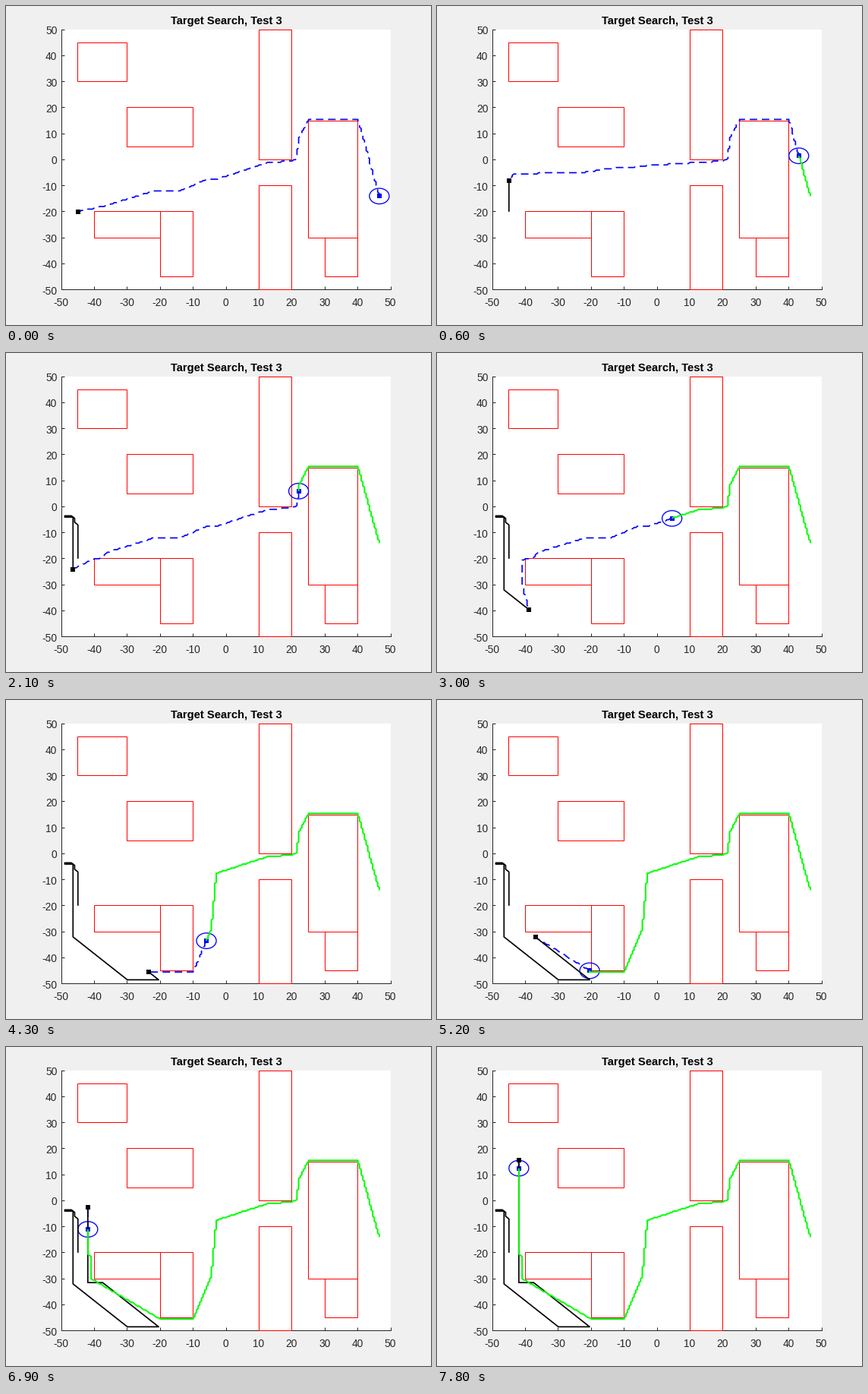
A matplotlib script that plays this animation: 560x420 px, repeating every 8800 ms.

```python
import numpy as np
import matplotlib.pyplot as plt
from matplotlib.animation import FuncAnimation
from matplotlib.patches import Ellipse, Rectangle
from matplotlib.transforms import Affine2D

W, H, DPI = 560, 420, 100
FRAMES, LAST, STEP_MS = 88, 78, 100
GRID = 0.5
PX = 72 / DPI  # points per pixel

plt.rcParams.update({
    "font.family": "Liberation Sans",
    "axes.unicode_minus": False,
})

# x, y, width, height
WALLS = [(-45, 30, 15, 15), (-30, 5, 20, 15), (10, 0, 10, 50),
         (10, -50, 10, 40), (25, -30, 15, 45), (30, -45, 10, 15),
         (-40, -30, 20, 10), (-20, -45, 10, 25)]

# corners of the two walks
RUN = np.array([(-45, -20), (-45, -7), (-46, -6), (-46, -4.5), (-47, -3.5),
                (-49, -3.5), (-49, -4), (-46.5, -4), (-46.5, -32),
                (-30, -48.5), (-20.5, -48.5), (-37.5, -31.5),
                (-42, -31.5), (-42, 15.5)])
CHASE = np.array([(46.5, -14), (40, 15.5), (25, 15.5), (22, 8), (21.5, 0.5),
                  (20, -0.5), (13, -1), (-3, -7.5), (-4.5, -29),
                  (-10, -45.5), (-20, -45.5), (-41, -30), (-41, -21.5),
                  (-42, -20.5), (-42, 12.5)])
FORK, DROP, BOTTOM = 6, 7, 10  # corner numbers in CHASE

# planned crossings of the open middle, for a low and a high goal
LOW = np.array([(-3, -7.5), (-6, -7.5), (-14, -12), (-22, -12), (-36, -17.5)])
HIGH = np.array([(-3, -2), (-6, -2.5), (-14, -3), (-22, -4.5), (-44, -5)])


def snap(points):
    """Walk a polyline on the planning grid."""
    pts = np.asarray(points, float)
    out = [pts[:1]]
    for a, b in zip(pts, pts[1:]):
        n = max(1, int(np.ceil(np.abs(b - a).max() / GRID)))
        out.append(a + (b - a) * np.arange(1, n + 1)[:, None] / n)
    return np.round(np.vstack(out) / GRID) * GRID


def grid_cost(d):
    """Three diagonal cells take as long as four straight ones."""
    return d.max(axis=1) + d.min(axis=1) / 3


def euclid(d):
    return np.hypot(*d.T)


def schedule(path, cost):
    """Time at which each corner is reached, at constant pace."""
    total = np.append(0, np.cumsum(cost(np.abs(np.diff(path, axis=0)))))
    return total / total[-1] * LAST


RUN_T = schedule(RUN, grid_cost)
CHASE_T = schedule(CHASE, euclid)


def walked(path, times, n):
    """Corners passed by time n, then the present position."""
    here = [np.interp(n, times, path[:, i]) for i in (0, 1)]
    return np.vstack([path[times < n], here])


def plan(n, here, goal):
    """Route from the seeker to the runner."""
    gx, gy = goal
    leg = np.searchsorted(CHASE_T, n, side="right")
    if leg <= DROP:
        w = np.clip((gy + 20) / 12.5, 0, 1)
        cross = (1 - w) * LOW + w * HIGH
        via = [*CHASE[leg:FORK + 1], *cross[cross[:, 0] < here[0]]]
        if gy < -20:
            via += [(-37.5, -19.5), (-41, -20.5)]
            if gx > -43.5:
                via.append((-41, -30))
    elif leg <= BOTTOM:
        via = [*CHASE[leg:BOTTOM + 1]]
    else:
        ahead = CHASE[leg:]
        via = [*ahead[ahead[:, 1] < gy - 2]]
    return snap([here, *via, goal])


fig = plt.figure(figsize=(W / DPI, H / DPI), dpi=DPI, facecolor="#f0f0f0")
ax = fig.add_axes([72.6 / W, 46.97 / H, 434 / W, 342.3 / H])
ax.set(xlim=(-50, 50), ylim=(-50, 50),
       xticks=range(-50, 51, 10), yticks=range(-50, 51, 10))
ink = "#262626"
ax.tick_params(direction="in", length=4.3 * PX, width=PX, color=ink,
               labelcolor=ink, labelsize=13.8 * PX)
ax.tick_params(axis="x", pad=10.7 * PX)
ax.tick_params(axis="y", pad=5.3 * PX)
for label in ax.get_yticklabels():
    label.set_transform(label.get_transform() + Affine2D().translate(0, -1))
for side in ("top", "right"):
    ax.spines[side].set_visible(False)
for side in ("left", "bottom"):
    ax.spines[side].set(color=ink, linewidth=PX)
fig.text(290 / W, 1 - 24 / H, "Target Search, Test 3", weight="bold",
         size=14.8 * PX, ha="center", va="baseline", color="black")

for x, y, w, h in WALLS:
    ax.add_patch(Rectangle((x, y), w, h, fill=False, ec="red", lw=PX,
                           snap=True, clip_on=False, zorder=3))

# smooth lines run through pixel centres
centred = ax.transData + Affine2D().translate(0.5, -0.5)


def line(color, width, z, **kw):
    return ax.plot([], [], color=color, lw=width * PX, zorder=z, snap=False,
                   solid_capstyle="butt", transform=centred, **kw)[0]


def dot(color, z):
    return ax.plot([], [], "s", color=color, ms=6 * PX, mew=0, zorder=z,
                   transform=centred)[0]


route = line("blue", 1.7, 4, dashes=(10 / 1.7, 6 / 1.7),
             dash_capstyle="butt")
ring = ax.add_patch(Ellipse((0, 0), 6, 6, fill=False, ec="blue",
                            lw=1.33 * PX, zorder=5, transform=centred))
seeker, runner = dot("blue", 6), dot("black", 6)
run_line = line("black", 1.7, 7)
chase_line = line("lime", 2, 8)


def draw(i):
    n = min(i, LAST)
    run = walked(RUN, RUN_T, n)
    run[-1] = np.round(run[-1] / GRID) * GRID
    chase = snap(walked(CHASE, CHASE_T, n))
    here, goal = chase[-1], run[-1]
    route.set_data(*plan(n, here, goal).T)
    run_line.set_data(*run.T)
    chase_line.set_data(*chase.T)
    ring.set_center(here)
    seeker.set_data(*chase[-1:].T)
    runner.set_data(*run[-1:].T)
    return route, ring, seeker, runner, run_line, chase_line


anim = FuncAnimation(fig, draw, frames=FRAMES, interval=STEP_MS,
                     repeat=True, repeat_delay=0)
plt.show()
```
